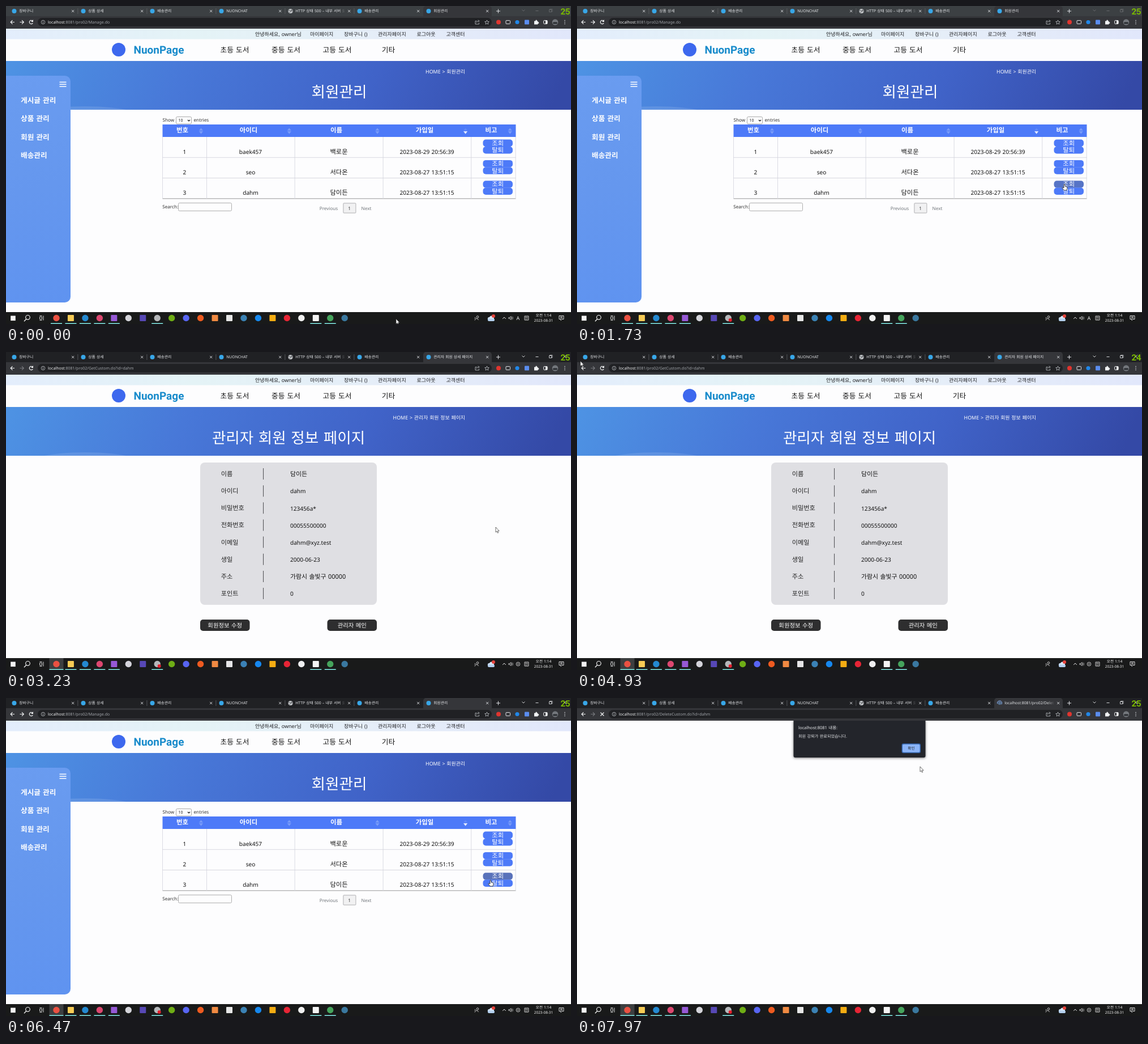
Write an HTML page with a canvas that moves like this. It is 998x561 px and loops after 8 s.

```html
<!DOCTYPE html>
<html lang="ko">
<head>
<meta charset="utf-8">
<title>회원관리</title>
<style>
html, body { margin: 0; width: 100%; height: 100%; overflow: hidden; background: #fdfdfe; }
canvas { display: block; width: 998px; height: 561px; }
</style>
</head>
<body>
<canvas id="stage" width="998" height="561"></canvas>
<script>
const ctx = document.getElementById('stage').getContext('2d');
const FONT = '"Noto Sans", "Noto Sans CJK KR", "Noto Sans CJK JP", "Noto Sans CJK", sans-serif';
const LOOP = 8000;
const T = { record: 700, view: 2050, detail: 2560, list: 5480, remove: 7050, dialog: 7570 };
const BLUE = [77, 122, 248], GREY = [106, 103, 92];
const PAGE = '#fdfdfe';

const clamp = v => Math.max(0, Math.min(1, v));
const between = (t, a, b) => t >= a && t < b;

function text(str, x, y, size, color = '#111', align = 'left', weight = 400, font = FONT) {
  ctx.font = `${weight} ${size}px ${font}`;
  ctx.wordSpacing = size * 0.06 + 'px';
  ctx.textRendering = 'geometricPrecision';
  ctx.textAlign = align;
  ctx.fillStyle = color;
  ctx.fillText(str, x, y);
}
function rect(x, y, w, h, color, radius = 0) {
  ctx.fillStyle = color;
  ctx.beginPath();
  ctx.roundRect(x, y, w, h, radius);
  ctx.fill();
}
function frame(x, y, w, h, color, radius = 0, width = 1) {
  ctx.strokeStyle = color;
  ctx.lineWidth = width;
  ctx.beginPath();
  ctx.roundRect(x, y, w, h, radius);
  ctx.stroke();
}
function dot(x, y, r, color) {
  ctx.fillStyle = color;
  ctx.beginPath();
  ctx.arc(x, y, r, 0, 7);
  ctx.fill();
}
function ring(x, y, r, color, width = 1, from = 0, to = 7) {
  ctx.strokeStyle = color;
  ctx.lineWidth = width;
  ctx.beginPath();
  ctx.arc(x, y, r, from, to);
  ctx.stroke();
}
function path(d, x, y, fill, stroke, width = 1) {
  const p = new Path2D(d);
  ctx.save();
  ctx.translate(x, y);
  if (fill) { ctx.fillStyle = fill; ctx.fill(p); }
  if (stroke) { ctx.strokeStyle = stroke; ctx.lineWidth = width; ctx.stroke(p); }
  ctx.restore();
}
const cross = (x, y, r, color, width = 1) =>
  path(`M${-r} ${-r}L${r} ${r}M${r} ${-r}L${-r} ${r}`, x, y, null, color, width);
function gradient(x0, y0, x1, y1, ...colors) {
  const g = ctx.createLinearGradient(x0, y0, x1, y1);
  colors.forEach((c, i) => g.addColorStop(i / (colors.length - 1), c));
  return g;
}
function globe(x, y, color) {
  dot(x, y, 4, color);
  path('M-3.5 -1C-1 -2 1 1 3.5 -1M-2 3C-1 0 2 2 2 -3', x, y, null, '#35363a', 0.8);
}

// Browser window
function browser(t, page) {
  const active = t >= T.view;
  const loading = t >= T.remove || between(t, T.view, T.detail);
  const strip = active ? '#202124' : '#3c4043', toolbar = '#35363a';
  const controls = active ? '#e8eaed' : '#6b6d70';
  rect(0, 0, 998, 18, strip);
  rect(0, 18, 998, 22, toolbar);
  rect(737, 0, 121, 24, toolbar, 5);

  const current = { list: '회원관리', detail: '관리자 회원 상세 페이지',
    dialog: 'localhost:8081/pro02/DeleteCustom' }[page];
  const titles = ['장바구니', '상품 상세', '배송관리', 'NUONCHAT', 'HTTP 상태 500 – 내부 서버 오류', '배송관리', current];
  titles.forEach((title, i) => {
    const x = 14.5 + i * 122;
    const back = i === 6 ? toolbar : strip;
    if (i === 4) globe(x, 9, '#c4c7ca');
    else if (i < 6 || !loading) dot(x, 9, 4, '#38a7e8');
    else if (page === 'dialog') {
      dot(x, 9, 3, '#56708f');
      ring(x, 9, 4, '#8ab4f8', 1, t / 150, t / 150 + 4);
    }
    ctx.save();
    ctx.beginPath();
    ctx.rect(x, 0, 96, 18);
    ctx.clip();
    text(title, x + 8.7, 11.3, 6.8, '#e3e5e8');
    ctx.restore();
    rect(x + 85, 2, 12, 14, gradient(x + 85, 0, x + 97, 0, back + '00', back));
    cross(x + 103.7, 9, 2.1, '#dfe1e5', 0.9);
    if (i < 5) rect(x + 112, 4, 0.8, 10, '#5f6165');
  });
  path('M-3.5 0H3.5M0 -3.5V3.5', 869.5, 9, null, '#dfe1e5', 1);
  path('M-2.5 -1.5L0 1L2.5 -1.5', 914, 8, null, controls, 0.9);
  rect(935.5, 8, 5, 0.9, controls);
  frame(959.5, 6.5, 4, 4, controls, 0, 0.8);
  path('M1 0V-1H5.5V3.5H4.2', 959.5, 6.5, null, controls, 0.7);
  cross(987, 8, 2.8, controls, 0.9);
  text(between(t, 4500, 5400) ? '24' : '25', 988, 15, 15, '#79b800', 'center', 700, 'Roboto, sans-serif');

  path('M3.5 0H-3.3M0 -3.3L-3.3 0L0 3.3', 11.5, 28.5, null, '#f1f3f4', 1.2);
  path('M-3.5 0H3.3M0 -3.3L3.3 0L0 3.3', 28, 28.5, null, page === 'list' ? '#f1f3f4' : '#77797d', 1.2);
  if (loading) cross(44.5, 28.5, 3, '#f1f3f4', 1.2);
  else {
    ring(44.5, 28.5, 3.2, '#f1f3f4', 1.2, 0.5, 5.6);
    path('M0 0H4V-4Z', 44, 28, '#f1f3f4');
  }
  rect(56, 21, 802, 15, '#202124', 7.5);
  ring(65.5, 28.5, 3.3, '#c5c8cc', 0.8);
  rect(65.1, 27.8, 0.9, 2.5, '#c5c8cc');
  rect(65.1, 26.4, 0.9, 0.9, '#c5c8cc');
  const host = 'localhost';
  text(host, 74, 31, 7, '#f1f3f4');
  const hostWidth = ctx.measureText(host).width;
  const address = { list: 'Manage.do', detail: 'GetCustom.do?id=dahm', dialog: 'DeleteCustom.do?id=dahm' }[page];
  text(':8081/pro02/' + address, 74 + hostWidth, 31, 7, '#a3a7ac');

  path('M-1 -2H-3.5V3.5H3V1M-1.5 1C-1 -1 0 -2 3 -2M1.5 -4L3.5 -2L1.5 0', 832.5, 28.5, null, '#c5c8cc', 0.8);
  path('M0 -3.8L1.1 -1.2L3.8 -1L1.8 .8L2.4 3.5L0 2L-2.4 3.5L-1.8 .8L-3.8 -1L-1.1 -1.2Z', 849.5, 28.7, null, '#c5c8cc', 0.8);
  dot(870, 28.5, 4, '#e0352f');
  frame(883, 25.5, 7.5, 6, '#dfe1e5', 1, 1);
  dot(903, 28.5, 3.6, '#2187e8');
  rect(916, 24.5, 8, 8, '#5b8def', 1);
  path('M-3.5 -2H-1A1.3 1.3 0 1 1 1.3 -2H3V0A1.3 1.3 0 1 1 3 2.4V4H-3.5Z', 936.5, 28.5, '#f1f3f4');
  frame(949.7, 25.5, 6.5, 6, '#f1f3f4', 1, 1);
  rect(953, 25.5, 3, 6, '#f1f3f4');
  dot(970, 28.5, 5.3, '#73777c');
  rect(966, 28.5, 8, 3, '#2a2d31', 1.5);
  for (const y of [25.5, 28.5, 31.5]) dot(987, y, 0.8, '#dfe1e5');
}

// Taskbar
function taskbar(t) {
  const active = t >= T.view;
  const light = '#f2f2f2';
  rect(0, 540, 998, 21, '#191a1a');
  if (active) rect(76.5, 540, 25, 21, '#3d3f40');
  rect(8.2, 546.5, 8.6, 8.6, light);
  ring(38.5, 549.3, 3.8, light, 1.2);
  path('M0 0L-4 4.3', 36, 552, null, light, 1.3);
  frame(59.5, 548.5, 4, 4, light, 0, 0.8);
  path('M-2.5 -4H1.5M-2.5 4H1.5M4 -4V4', 62, 550.5, null, light, 0.9);

  const apps = ['#ea5142', '#f6cb55', '#2489d0', '#dc4770', '#9659d6', '#d4d4da', '#5748b5', '#b5b7ba',
    '#6fae15', '#5865f2', '#ee5b20', '#f08a42', '#e6e6e6', '#3b82b4', '#1688ee', '#f4ad12', '#e72535',
    '#f0f0f0', '#f4f4f4', '#45a45c', '#3a789f'];
  const squares = [1, 4, 6, 11, 12, 15, 18];
  const running = [0, 1, 2, 3, 4, 7, 18, 19];
  apps.forEach((color, i) => {
    const x = 89 + i * 25.46;
    if (squares.includes(i)) rect(x - 5.5, 545, 11, 11, color, 1);
    else dot(x, 550.5, 5.7, color);
    if (i === 7 && t >= T.record) dot(x + 3.5, 554, 3, '#e51f2c');
    const wide = i === 0 && active ? 2.5 : 0;
    if (running.includes(i)) rect(x - 10 - wide, 559.3, 20 + wide * 2, 1.7, '#76d3cf');
  });

  ring(833, 548.5, 1.8, light, 0.8);
  path('M-4 4C-3 0 1 0 2.5 3.5M-3 -1.5L-4 1', 832, 550.5, null, light, 0.8);
  dot(854, 552, 3.2, '#c9dcf2');
  dot(858, 550.5, 4, '#dbe9f8');
  rect(851, 551.5, 12, 4.5, '#b4d0ee', 2);
  dot(861, 547, 3, '#e8443c');
  path('M-2.8 1.4L0 -1.4L2.8 1.4', 880, 550.5, null, light, 1);
  path('M-4 -1H-2L0 -3V3L-2 1H-4Z', 892, 550.5, null, light, 0.8);
  ring(891.5, 550.5, 2.5, light, 0.7, -0.8, 0.8);
  ring(891.5, 550.5, 4.2, '#aaa', 0.7, -0.8, 0.8);
  if (active) {
    ring(904.5, 550.5, 3.3, '#d8d8d8', 0.9);
    cross(904.5, 550.5, 1.5, '#d8d8d8', 0.9);
  } else text('A', 904.3, 554, 9, light, 'center');
  frame(916, 547, 7, 7, light, 0, 0.8);
  text('한', 919.5, 553, 6, light, 'center');
  text('오전 1:14', 949.5, 547.8, 6.6, light, 'center');
  text('2023-08-31', 949.5, 557.4, 6.4, light, 'center');
  path('M-4 -3.5H4V2.5H1L-1 4.5V2.5H-4ZM-2 -1.5H2M-2 .5H2', 981, 550, null, light, 0.9);
}

// Site header with hero band
function siteHeader(title, titleX, crumb) {
  rect(0, 40, 998, 501, PAGE);
  rect(0, 40, 998, 18.5, gradient(0, 0, 998, 0, '#e3edfc', '#e4f3f6', '#e5edf8', '#e1e7fb'));
  const links = [['안녕하세요, owner님', 440], ['마이페이지', 537], ['장바구니 ()', 597],
    ['관리자페이지', 657], ['로그아웃', 725.5], ['고객센터', 777.5]];
  for (const [label, x] of links) text(label, x, 52.5, 9, '#202124');
  dot(199, 77, 12, '#3d68ee');
  text('NuonPage', 225.5, 83.7, 19, '#188bcb', 'left', 700, 'Roboto, sans-serif');
  [['초등 도서', 404], ['중등 도서', 494.5], ['고등 도서', 585], ['기타', 675.5]]
    .forEach(([label, x]) => text(label, x, 81.5, 12.7, '#111', 'center', 500));

  rect(0, 97, 998, 86, gradient(60, -60, 900, 320, '#4e94e4', '#4878d8', '#4063c8', '#3449a6'));
  ctx.save();
  ctx.beginPath();
  ctx.rect(0, 97, 998, 86);
  ctx.clip();
  ctx.beginPath();
  ctx.ellipse(140, 207, 120, 30, 0, 0, 7);
  ctx.fillStyle = '#ffffff1c';
  ctx.fill();
  ctx.restore();
  text(crumb, 811, 119.3, 8.9, '#fff', 'right');
  text(title, titleX, 160.5, 26.6, '#fff', 'center', 300);
}

function hoverColor(t, spans) {
  const k = Math.max(0, ...spans.map(([a, b]) => Math.min(clamp((t - a) / 380), 1 - clamp((t - b) / 380))));
  return `rgb(${BLUE.map((c, i) => Math.round(c + (GREY[i] - c) * k))})`;
}

function statusBubble(file) {
  const label = `localhost:8081/pro02/${file}?id=dahm`;
  ctx.font = `6px ${FONT}`;
  rect(0, 529, ctx.measureText(label).width + 5, 12, '#292a2d', [0, 3, 0, 0]);
  text(label, 2, 537.5, 6, '#d6d8db');
}

function listPage(t) {
  siteHeader('회원관리', 588.5, 'HOME > 회원관리');
  rect(0, 123, 114, 400, gradient(0, 123, 114, 523, '#6a9cf0', '#6597ee', '#5f93f0'), [0, 10, 10, 0]);
  for (const y of [133.6, 137.4, 141.2]) rect(94.5, y, 12, 1.5, '#fff');
  ['게시글 관리', '상품 관리', '회원 관리', '배송관리']
    .forEach((label, i) => text(label, 26, 171 + i * 32.3, 12.7, '#fff', 'left', 700));

  text('Show', 276.5, 204.2, 8.2, '#333');
  frame(300.5, 195.5, 27, 12.5, '#a0a0a0', 2, 0.9);
  text('10', 304.5, 204.3, 7, '#222');
  path('M-2 -1L0 1L2 -1', 323, 202, null, '#111', 1.2);
  text('entries', 331.5, 204.2, 8.2, '#333');

  rect(276.5, 209, 624, 22, '#4d7af8');
  const edges = [276.5, 354.5, 510, 666, 821.7, 900];
  const centers = [315.5, 432, 588, 743.5, 868.5];
  [['번호', 311.5], ['아이디', 428.5], ['이름', 583.5], ['가입일', 739.5], ['비고', 857]]
    .forEach(([label, x]) => text(label, x, 223.4, 11.4, '#fff', 'center', 700));
  [344.5, 500.3, 656, 811.6, 890.3].forEach((x, i) => {
    path('M-3.6 0L0 -4.5L3.6 0Z', x, 219.8, i === 3 ? '#5f88f8' : '#799cf8');
    path('M-3.6 0L0 4.8L3.6 0Z', x, 221, i === 3 ? '#e3eaff' : '#799cf8');
  });
  const rows = [['1', 'baek457', '백로운', '2023-08-29 20:56:39'],
    ['2', 'seo', '서다온', '2023-08-27 13:51:15'], ['3', 'dahm', '담이든', '2023-08-27 13:51:15']];
  rows.forEach((row, i) => {
    const y = 231 + i * 36.3;
    const last = i === 2;
    row.forEach((value, c) => text(value, centers[c], y + 29.5, c === 2 ? 11.2 : 10.1, '#111', 'center'));
    rect(842.5, y + 4.6, 52.5, 12.6, hoverColor(t, last ? [[1610, 3000], [6320, 6480]] : []), 5);
    rect(842.5, y + 17, 52.5, 12.4, hoverColor(t, last ? [[6490, 9000]] : []), 5);
    text('조회', 868.7, y + 14.6, 11.3, '#fff', 'center');
    text('탈퇴', 868.7, y + 27.3, 11.3, '#fff', 'center');
    rect(276.5, y + 35.8, 624, 0.9, last ? '#777' : '#d8d8df');
  });
  for (const x of edges) rect(x - 0.3, 231, 0.8, 109, '#d2d3dc');

  text('Search:', 276.3, 356.7, 8.1, '#333');
  frame(304.5, 347.5, 94, 14, '#a5a5a5', 2, 0.9);
  text('Previous', 570, 359.5, 8.1, '#70757a', 'center');
  rect(595.5, 347.5, 22.5, 18, '#f1f1f2', 1);
  frame(595.9, 347.9, 22, 17.2, '#a9a9ad', 1, 0.9);
  text('1', 606.7, 359.5, 8.2, '#333', 'center');
  text('Next', 636.5, 359.5, 8.1, '#70757a', 'center');

  if (between(t, 1800, T.detail)) statusBubble('GetCustom.do');
  if (t >= 6600) statusBubble('DeleteCustom.do');
}

function detailPage() {
  siteHeader('관리자 회원 정보 페이지', 499, 'HOME > 관리자 회원 정보 페이지');
  rect(343, 195, 312, 251, '#dfdfe3', 8);
  const fields = [['이름', '담이든'], ['아이디', 'dahm'], ['비밀번호', '123456a*'], ['전화번호', '00055500000'],
    ['이메일', 'dahm@xyz.test'], ['생일', '2000-06-23'], ['주소', '가람시 솔빛구 00000'], ['포인트', '0']];
  fields.forEach(([label, value], i) => {
    const y = 219 + i * 30.15;
    text(label, 379.7, y, 11.2, '#222');
    rect(454, y - 14, 1.1, 20, '#55565a');
    text(value, 502, y + 0.3, /[가-힣]/.test(value) ? 10.9 : 10.1, '#111');
  });
  [['회원정보 수정', 343], ['관리자 메인', 567.5]].forEach(([label, x]) => {
    rect(x, 472, 87.5, 20, '#2e2e2f', 5);
    text(label, x + 43.7, 485.9, 10.4, '#fff', 'center');
  });
}

function dialogPage() {
  rect(0, 40, 998, 501, PAGE);
  ctx.save();
  ctx.shadowColor = '#0008';
  ctx.shadowBlur = 4;
  ctx.shadowOffsetY = 1;
  rect(382.5, 40, 233, 65, '#23252b', [0, 0, 3, 3]);
  ctx.restore();
  text('localhost:8081 내용:', 391, 54.6, 7.5, '#e8eaed');
  text('회원 강퇴가 완료되었습니다.', 391, 69.6, 7.2, '#e0e2e5');
  rect(573.5, 80.3, 33.5, 17, '#3566ad', 3);
  rect(575, 81.8, 30.5, 14, '#8ab4f8', 2);
  text('확인', 590.4, 91.2, 6.7, '#202124', 'center');
}

// Pointer stops: [time, x, y], eased in between
const stops = [[0, 689, 552], [900, 690, 551], [1680, 861, 314], [2600, 861, 314], [3000, 865, 309],
  [3430, 865, 309], [4300, 6, 16], [4930, 6, 16], [5250, 9, 26], [5600, 9, 26], [6330, 855, 317],
  [6470, 856, 321], [6750, 862, 329], [7600, 862, 329], [7970, 606, 121], [8000, 604, 118]];

function pointer(t) {
  const i = Math.max(1, stops.findIndex(s => s[0] > t));
  const [t0, x0, y0] = stops[i - 1], [t1, x1, y1] = stops[i];
  const k = (t - t0) / (t1 - t0), e = k * k * (3 - 2 * k);
  const x = x0 + (x1 - x0) * e, y = y0 + (y1 - y0) * e;
  const hand = between(t, 1580, T.view) || between(t, 6300, T.remove);
  if (hand) path('M-1 1Q0 -1 1 1V4L4 5Q5 5 5 7L4 11H-1L-4 7Q-4 5 -2 6.5L-1 7Z', x, y, '#fff', '#222', 0.8);
  else path('M0 0V9L2 7.2L3.4 10.3L4.8 9.7L3.4 6.7H6.2Z', x, y, '#fff', '#333', 0.7);
}

function draw(now) {
  const t = now % LOOP;
  const page = t >= T.dialog ? 'dialog' : between(t, T.detail, T.list) ? 'detail' : 'list';
  ({ list: listPage, detail: detailPage, dialog: dialogPage })[page](t);
  browser(t, page);
  taskbar(t);
  pointer(t);
  requestAnimationFrame(draw);
}
requestAnimationFrame(draw);
</script>
</body>
</html>
```
